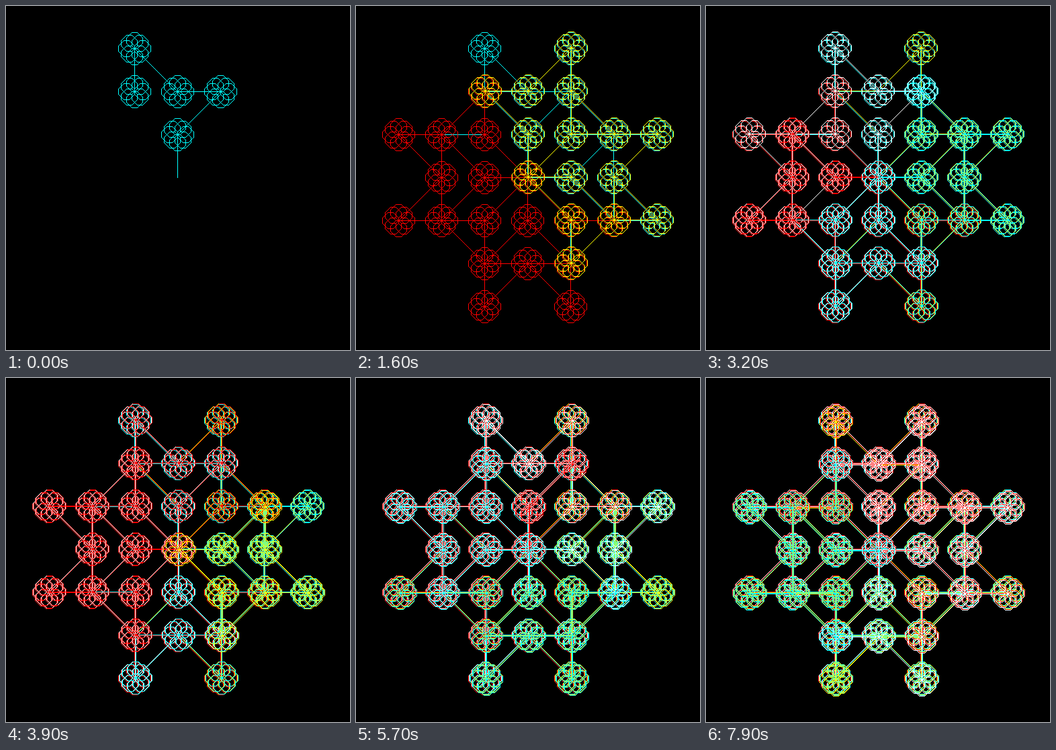
Write an HTML page with a canvas that moves like this. It is 512 px wide and 512 px high and loops after 8000 ms.

```html
<!DOCTYPE html>
<html lang="en">
<head>
<meta charset="utf-8">
<title>Flower lattice</title>
<style>
  html, body { margin: 0; width: 100%; height: 100%; overflow: hidden; background: #000; }
  canvas { display: block; width: 100vw; height: 100vh; image-rendering: pixelated; }
</style>
</head>
<body>
<canvas id="stage" width="512" height="512"></canvas>
<script>
const ctx = document.getElementById('stage').getContext('2d');

const LOOP_MS = 8000, TICK_MS = 100, STEPS_PER_TICK = 5;
const CELL = 64, SIDE = 8;
const COLORS = ['#0ff', '#f00', '#ff0', '#fff'];

// Eight compass headings, clockwise from north
const DIRS = [[0, -1], [1, -1], [1, 0], [1, 1], [0, 1], [-1, 1], [-1, 0], [-1, -1]];
const dirOf = heading => DIRS[((heading % 8) + 8) % 8];

let pen, stepsDone;

function reset() {
  ctx.fillStyle = '#000';
  ctx.fillRect(0, 0, 512, 512);
  pen = { x: 255, y: 255 };
  stepsDone = 0;
}

function forward(p, heading, length) {
  const [dx, dy] = dirOf(heading);
  for (let i = 0; i <= length; i++) ctx.fillRect(p.x + dx * i, p.y + dy * i, 1, 1);
  p.x += dx * length;
  p.y += dy * length;
}

// Eight octagons, each touching the centre with the middle of one side
function flower({ x, y }) {
  for (let start = 0; start < 8; start++) {
    const p = { x, y };
    forward(p, start, SIDE / 2);
    for (let turn = 1; turn < 8; turn++) forward(p, start + turn, SIDE);
    forward(p, start, SIDE / 2);
  }
}

// Closed loops of 8 steps; 8 loops make a round, and each round starts
// one heading further and one pixel away
function step(i) {
  const round = Math.floor(i / 64), loop = Math.floor(i / 8) % 8, k = i % 8;
  if (i > 0 && i % 64 === 0) {
    const [dx, dy] = dirOf(round);
    pen.x += dx;
    pen.y += dy;
  }
  ctx.fillStyle = COLORS[Math.floor(i / 32) % COLORS.length];
  forward(pen, round + loop + k % 2 - 2 * Math.floor(k / 2), CELL);
  flower(pen);
}

function render(ms) {
  const target = (Math.floor((ms % LOOP_MS) / TICK_MS) + 1) * STEPS_PER_TICK;
  if (target < stepsDone) reset();
  while (stepsDone < target) step(stepsDone++);
}

const startTime = performance.now();
function frame() {
  render(performance.now() - startTime);
  requestAnimationFrame(frame);
}
reset();
frame();
</script>
</body>
</html>
```
